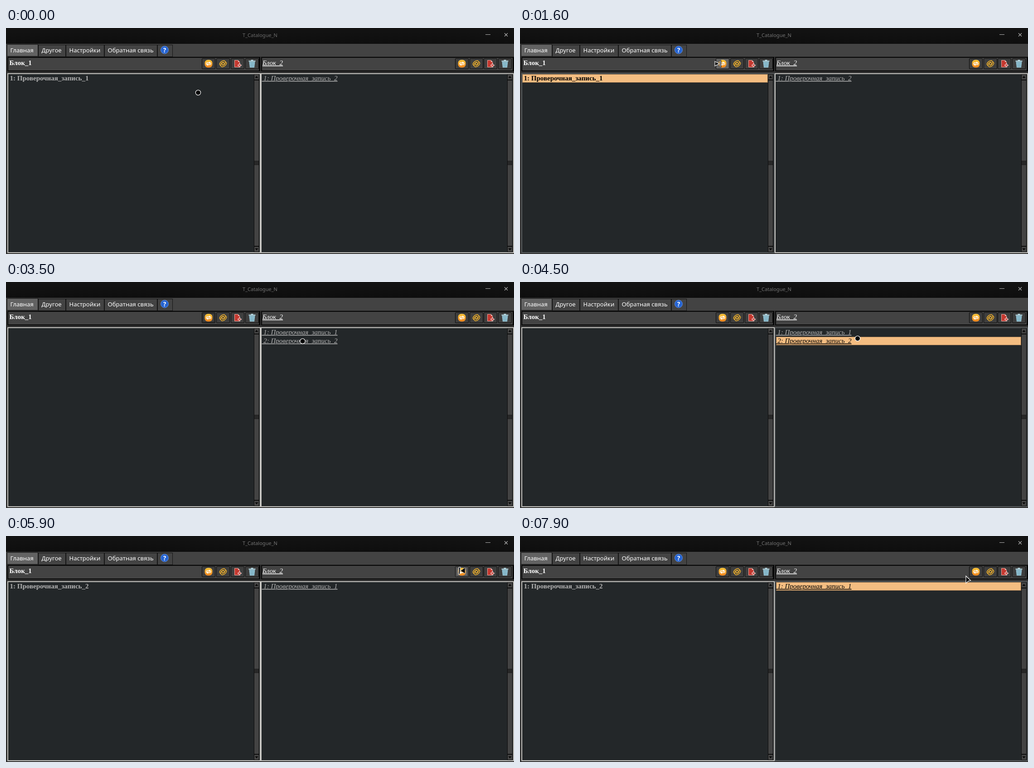
Animation of 1121x500 px, one loop 8 s. Source, as an HTML page:

```html
<!DOCTYPE html>
<html lang="ru">
<head>
<meta charset="utf-8">
<title>T_Catalogue_N</title>
<style>
  html, body { margin: 0; width: 100%; height: 100%; overflow: hidden; background: #333; }
  svg { display: block; width: 1121px; height: 500px; }
  text { white-space: pre; }
  .ui { font: 500 13px "Noto Sans", "Open Sans", sans-serif; fill: #fff; }
  .title { font: 11px "Noto Sans", "Open Sans", sans-serif; text-anchor: middle; }
  .left text { font: bold 15px "Liberation Serif", "Times New Roman", serif; }
  .right text {
    font: italic 15px "Liberation Serif", "Times New Roman", serif;
    text-decoration: underline; text-decoration-skip-ink: none;
  }
  .head { fill: #fff; }
  .row text { fill: #b2b2b2; }
  .row rect { display: none; fill: #f4bd81; }
  .row .dots { fill: none; stroke: #14110d; stroke-dasharray: 1 1; }
  .row.on rect { display: inline; }
  .row.on text { fill: #000; }
  .frame { fill: #232729; stroke: #c3c2be; stroke-width: 2; }
  .frame.focus { stroke: #565a5c; }
  .btn rect { fill: #3e3e3e; stroke: #0a0a0a; }
  .btn.hover .face { fill: #656565; }
  .btn .ring { fill: none; stroke: none; }
  .btn.focus .ring { stroke: #000; stroke-dasharray: 1 1; }
</style>
</head>
<body>
<svg id="stage" viewBox="0 0 1121 500">
  <defs>
    <linearGradient id="bar" x2="0" y2="1">
      <stop stop-color="#131313"/><stop offset="1" stop-color="#0e0e0e"/>
    </linearGradient>
    <linearGradient id="gold" x2="0" y2="1">
      <stop stop-color="#fbc83c"/><stop offset="1" stop-color="#f0841c"/>
    </linearGradient>
    <g id="swap">
      <rect x="-8.5" y="-8.5" width="17" height="17" rx="7" fill="url(#gold)"/>
      <path d="M-5 1.6V0Q-5-2-3-2H3M1-4 4-2 1 0M5-1.6V0Q5 2 3 2H-3M-1 0-4 2-1 4"
            fill="none" stroke="#fff" stroke-width="1.3"/>
    </g>
    <g id="sync" fill="none" stroke="#f3b32c" stroke-width="1.4">
      <path d="M-8 1.5Q-5.5-6.5 2.5-7L6-4M8-1.5Q5.5 6.5-2.5 7L-6 4"/>
      <path d="M-8 1.5-5 4.5M8-1.5 5-4.5M-5 4.5Q-5.5-3 2-3.5M5-4.5Q5.5 3-2 3.5"/>
      <circle r="2.6"/>
    </g>
    <g id="add">
      <path d="M-6.5-7.5H1L4.5-4V7.5H-6.5Z" fill="#c4382f" stroke="#eba79f"/>
      <path d="M1-7.5V-4H4.5" fill="#f3cbc5"/>
      <path d="M.5 3.5H8.5M4.5-.5V7.5" stroke="#fff" stroke-width="3.2"/>
      <path d="M1.3 3.5H7.7M4.5.3V6.7" stroke="#c4382f" stroke-width="1.6"/>
    </g>
    <g id="bin">
      <path d="M-6.5-4.5H6.5L5 8.5H-5Z" fill="#93c3d4"/>
      <path d="M-7.5-5.7H7.5M-2.5-7.5H2.5" stroke="#b7dbe6" stroke-width="2"/>
      <path d="M-3-3-2.4 7M0-3V7M3-3 2.4 7" stroke="#6fa2b5" stroke-width="1"/>
    </g>
  </defs>

  <rect width="1121" height="500" fill="#333"/>
  <rect width="1121" height="36" fill="url(#bar)"/>
  <text id="title" class="title" x="560.5" y="20">T_Catalogue_N</text>
  <path d="M1058 14.5H1069M1100 11.5 1107 18.5M1107 11.5 1100 18.5" stroke="#b4b4b4" stroke-width="1.1"/>
  <rect y="35" width="1121" height="28" fill="#434343"/>
  <g id="tabs"></g>
  <circle cx="350" cy="48.5" r="8.5" fill="#2463d2" stroke="#6f9cec" stroke-width=".8"/>
  <text x="350" y="53.5" text-anchor="middle" font-family="Noto Sans, sans-serif" font-weight="700" font-size="14" fill="#fff">?</text>
  <g id="panels"></g>
  <g id="cursor"></g>
</svg>

<script>
const LOOP = 8000;
const $ = id => document.getElementById(id);
const rect = (x, y, w, h, extra = "") =>
  `<rect x="${x}" y="${y}" width="${w}" height="${h}" ${extra}/>`;

// Tabs: left edge, width, label
const tabs = [[2, 68, "Главная"], [71, 60, "Другое"], [132, 84, "Настройки"],
              [217, 116, "Обратная связь"], [334, 33, ""]];
$("tabs").innerHTML = tabs.map(([x, w, label], i) =>
  rect(x + .5, i ? 37.5 : 36.5, w, 26, `fill="${i ? "#434343" : "#626262"}" stroke="#151515"`) +
  `<text class="ui" x="${x + 7.5}" y="54">${label}</text>`).join("");

function scrollbar(x) {
  const grip = [0, 2, 4, 6, 8].map(d => `M${x + 1} ${294.5 + d}h10`).join("");
  return rect(x, 102, 12, 394, 'fill="#0c0c0c"') +
    rect(x + 1, 103, 10, 11, 'fill="#454545"') +
    rect(x + 1, 116, 10, 366, 'fill="#434343"') +
    rect(x + 1, 484, 10, 11, 'fill="#454545"') +
    `<path d="M${x + 2.5} 110.5h7l-3.5-4.5zM${x + 2.5} 487.5h7l-3.5 4.5z" fill="#050505"/>` +
    `<path d="${grip}" stroke="#0c0c0c"/>`;
}

function button(icon, i, dx, side) {
  const cx = 447 + i * 32 + dx;
  return `<g class="btn" ${i ? "" : `id="${side}Btn"`}>` +
    rect(cx - 14.5, 67.5, 29, 23, 'class="face" rx="1.5"') +
    rect(cx - 12.5, 69.5, 25, 19, 'class="ring"') +
    `<use href="#${icon}" x="${cx}" y="79"/></g>`;
}

function panel(side, n) {
  const dx = n ? 560 : 0;
  const rows = [0, 1].map(i => `<g class="row" id="${side}${i}">` +
    rect(5 + dx, 102 + 19 * i, 542 - n, 19) +
    rect(5.5 + dx, 102.5 + 19 * i, 541 - n, 18, 'class="dots"') +
    `<text x="${n ? 564.5 : 8.5}" y="${116 + 19 * i}"></text></g>`).join("");
  return `<g class="${side}">` +
    rect(3 + dx, 64, 558, 32, 'fill="#080808"') +
    rect(5 + dx, 66, 553, 28, 'fill="#434343"') +
    `<text class="head" x="${n ? 566 : 7.5}" y="82">Блок_${n + 1}</text>` +
    ["swap", "sync", "add", "bin"].map((k, i) => button(k, i, n ? 559 - (i > 1) : 0, side)).join("") +
    rect(4 + dx - n, 101, 557, 396, `class="frame" id="${side}List"`) +
    scrollbar(547 + dx - n) + rows + "</g>";
}
$("panels").innerHTML = panel("left", 0) + panel("right", 1);

const shapes = {
  dot: '<circle r="5.6" fill="#000" stroke="#fff" stroke-width="1.2"/>',
  arrow: '<path d="M.5.5 11 10.5 6 11.5.5 16.5Z" fill="#000" stroke="#fff" stroke-width="1.2"/>',
  flagR: '<path d="M-12-5-2 0-12 5Z" fill="#111" stroke="#fff" stroke-width="1.1"/>' +
         '<path d="M0-7.5V8" stroke="#000" stroke-width="4"/><path d="M-.3-7V7.5" stroke="#fff" stroke-width="1.6"/>',
  flagL: '<path d="M12-7 2 0 12 6Z" fill="#000" stroke="#eee" stroke-width=".6"/>' +
         '<path d="M-1.5-8H2L.5 7.5H-2.5Z" fill="#000" stroke="#fff" stroke-width="1.1"/>'
};

// Pointer path: first step time, shape, then x,y pairs 100 ms apart
const moves = [
  [0, "dot", 424, 143, 415.5, 136.5],
  [300, "dot", 409, 130, 402, 120, 398, 113],
  [1200, "dot", 401, 111, 410, 106],
  [1400, "arrow", 423, 94],
  [1500, "flagR", 436, 84, 442, 79],
  [2600, "flagR", 445, 84],
  [2700, "arrow", 455, 94],
  [2800, "dot", 475, 118, 505, 134, 540, 142, 575, 143, 610, 141, 635, 138, 650, 135, 654.5, 131],
  [4100, "dot", 657, 130.5, 664, 130, 680, 129, 709, 127, 745, 125, 790, 122, 836, 118, 879, 114],
  [4900, "dot", 922, 107],
  [5000, "arrow", 958, 94, 980, 88],
  [5200, "flagL", 997, 80, 1001, 77],
  [6200, "arrow", 972, 90],
  [6300, "dot", 885, 109, 792, 114, 727, 117, 707.5, 117.5],
  [7200, "dot", 717, 117, 762, 114, 832, 110, 902, 106],
  [7600, "arrow", 950, 93, 972, 91],
  [7900, "arrow", 983.5, 88]
];
const path = moves.flatMap(([t, shape, ...p]) =>
  p.filter((_, i) => i % 2 === 0).map((x, i) => ({ t: t + 100 * i, shape, x, y: p[2 * i + 1] })));

function setRow(id, label, on) {
  const g = $(id);
  g.style.display = label ? "" : "none";
  g.classList.toggle("on", on);
  g.querySelector("text").textContent = label;
}

function draw(t) {
  const within = (a, b = LOOP) => t >= a && t < b;
  const flag = (id, name, on) => $(id).classList.toggle(name, on);
  const entry = (pos, n) => `${pos}: Проверочная_запись_${n}`;
  const both = within(2100, 5900);

  $("title").setAttribute("fill", t < 700 ? "#6c6c6c" : "#757575");
  flag("leftList", "focus", within(700, 2000));
  flag("rightList", "focus", within(4000, 5700) || within(6800));
  flag("leftBtn", "hover", within(1500, 2700));
  flag("leftBtn", "focus", within(2000, 4000));
  flag("rightBtn", "hover", within(5200, 6200));
  flag("rightBtn", "focus", within(5700, 6800));

  setRow("left0", both ? "" : entry(1, t < 2100 ? 1 : 2), within(700, 2100));
  setRow("left1", "", false);
  setRow("right0", " " + entry(1, t < 2100 ? 2 : 1), within(6800));
  setRow("right1", both ? " " + entry(2, 2) : "", within(4000, 5900));

  const p = path.filter(s => s.t <= t).pop();
  if ($("cursor").dataset.shape !== p.shape) {
    $("cursor").dataset.shape = p.shape;
    $("cursor").innerHTML = shapes[p.shape];
  }
  $("cursor").setAttribute("transform", `translate(${p.x} ${p.y})`);
}

const start = performance.now();
function tick() {
  draw((performance.now() - start) % LOOP);
  requestAnimationFrame(tick);
}
tick();
</script>
</body>
</html>
```
